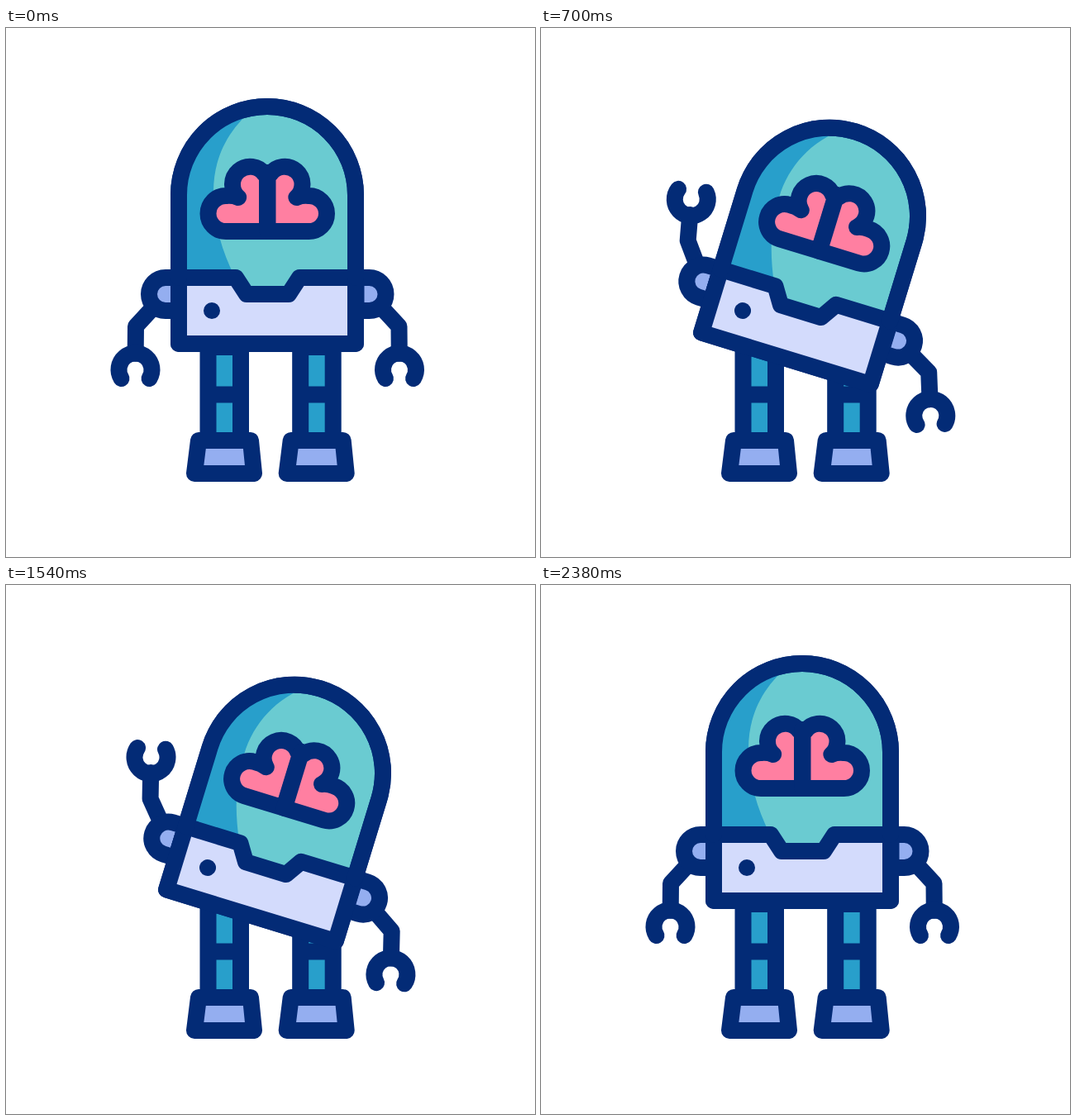
An HTML page that plays this animation: 640 by 640 pixels, repeating every 2.4 s.

```html
<!DOCTYPE html>
<html lang="en">
<head>
<meta charset="utf-8">
<title>Waving robot</title>
<style>
  html, body { margin: 0; height: 100%; overflow: hidden; background: #fff; }
  svg { display: block; width: 100vw; height: 100vh; }
  .line { stroke: #032b76; stroke-width: 20; stroke-linecap: round; stroke-linejoin: round; fill: none; }
  .blue { fill: #289fcb; }
  .lilac { fill: #94aef0; }
  .panel { fill: #d3dbfc; }
  .pink { fill: #ff7fa1; }
  .teal { fill: #6acbd1; }
</style>
</head>
<body>
<svg viewBox="0 0 640 640">
  <defs>
    <g id="leg">
      <path class="blue" d="M244.5 386H284V499H244.5ZM244.5 443.5H284"/>
      <path class="lilac" d="M233 499H296L300 539H228Z"/>
    </g>
    <path id="claw" d="M-17 10A20 20 0 1 1 17 10"/>
    <path id="shoulder" class="lilac" d="M209 302H193A20 20 0 0 0 193 342H209Z"/>
    <path id="lobe" class="pink" d="M316 246H266A21.5 21.5 0 0 1 266 203Q274 202 281 205A21.4 21.4 0 1 1 313 177L316 175Z"/>
  </defs>
  <g class="line">
    <use href="#leg"/>
    <use href="#leg" x="111.7"/>
    <g id="body">
      <g id="left"><path/><use href="#claw"/></g>
      <g id="right"><path/><use href="#claw"/></g>
      <use href="#shoulder"/>
      <use href="#shoulder" transform="translate(632.5) scale(-1 1)"/>
      <path class="teal" d="M209 382V202A107 107 0 0 1 423 202V382Z"/>
      <path class="blue" stroke="none" d="M209 302V202A107 107 0 0 1 303 95C268 122 251 158 251 198C251 237 261 268 276 300Z"/>
      <path class="panel" d="M209 302H278L291 322H342L355 302H423V382H209Z"/>
      <path d="M209 302V202A107 107 0 0 1 423 202V302M249 342h0"/>
      <use href="#lobe"/>
      <use href="#lobe" transform="translate(632.5) scale(-1 1)"/>
    </g>
  </g>
</svg>
<script>
const LOOP = 2400, { PI, min, max, sin, cos, exp } = Math;
const $ = id => document.getElementById(id);
const mix = (a, b, p) => a + (b - a) * p;

function ease(t, start, length) {
  const p = min(1, max(0, (t - start) / length));
  return p < .5 ? 4 * p ** 3 : 1 - 4 * (1 - p) ** 3;
}

// The elbow bend flips over as fold goes from 0 to 1, thinning the arm halfway
function drawArm(arm, place, fold) {
  const [limb, claw] = arm.children;
  const thin = 4 * fold * (1 - fold);
  const ex = mix(-36, -8, fold), ey = mix(39, 52, fold);
  const cx = -36.5, cy = mix(92, 94, fold);
  arm.setAttribute('transform', place);
  limb.setAttribute('d', `M0 0L${ex} ${ey}L${mix(cx, ex, .38)} ${mix(cy, ey, .38)}`);
  limb.style.strokeWidth = 20 * (1 - .22 * thin);
  claw.setAttribute('transform', `translate(${cx} ${cy}) rotate(${36 * fold}) scale(${1 - .09 * thin})`);
}

function draw(now) {
  const t = now % LOOP;
  const tilt = 17 * (ease(t, 20, 480) - ease(t, 1885, 480));

  // Time from the nearer end of the loop: the outward motion runs back the same way
  const edge = max(0, min(t, LOOP - t) - 20);
  const fold = min(1, edge / 540);

  // The left arm lifts and waves with fading swings; the right one hangs and sways slowly
  const lift = ease(t, 20, 540) - ease(t, 1900, 480);
  const wave = 6.5 * exp(-max(0, t - 700) / 600) * cos(2 * PI * (t - 750) / 420);
  const sway = 14.5 + 5.5 * cos(PI * (edge - 540) / 640);

  $('body').setAttribute('transform', `rotate(${tilt} 246.5 325.3)`);
  drawArm($('left'), `translate(193 322) rotate(${lift * (128.7 + wave)})`, fold);
  drawArm($('right'), `translate(439.5 322) rotate(${-sway * sin(fold * PI / 2)}) scale(-1 1)`, 0);
}

const start = performance.now();
(function tick() {
  draw(performance.now() - start);
  requestAnimationFrame(tick);
})();
</script>
</body>
</html>
```
